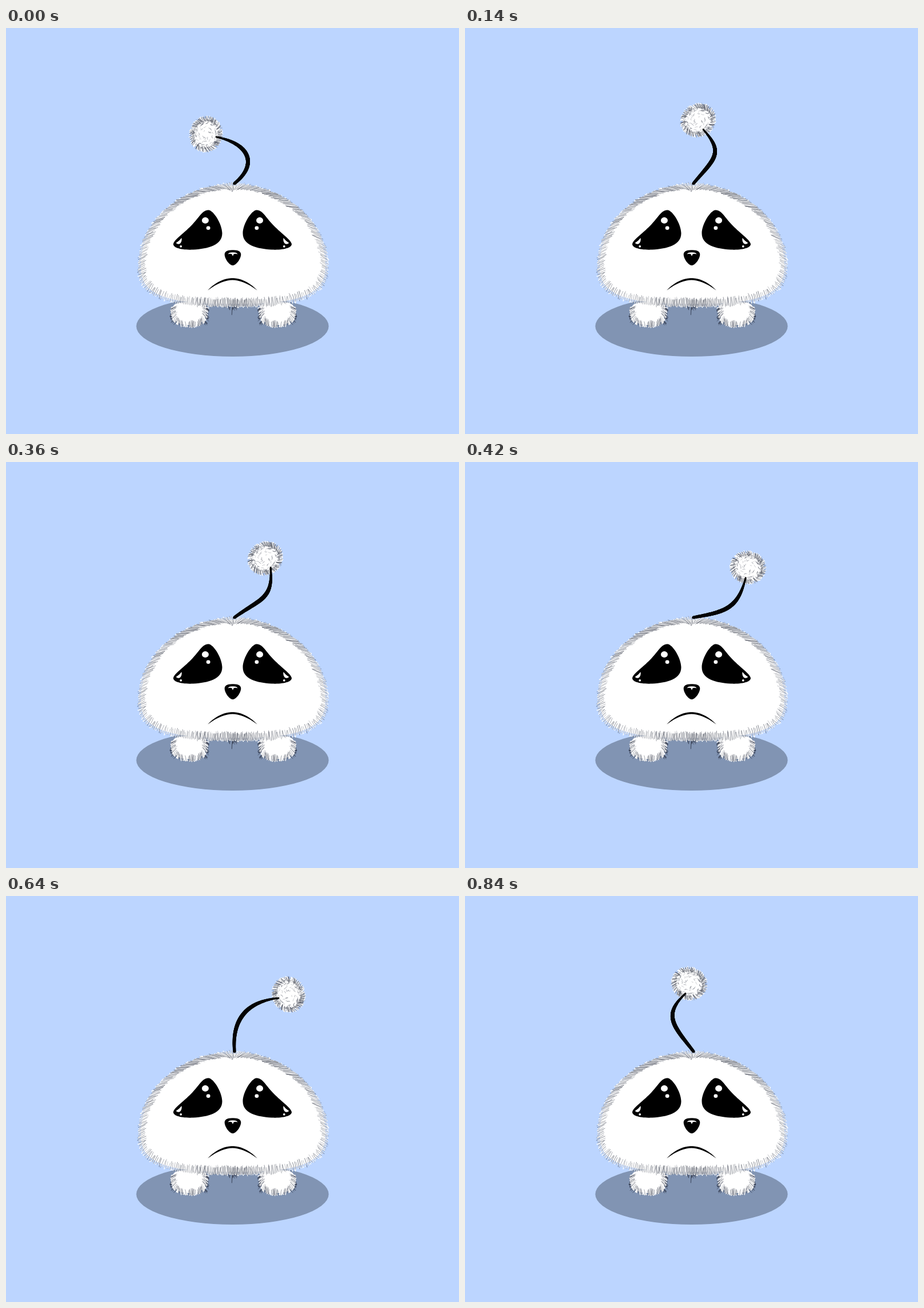
These frames come from a looping animation (791 by 708 pixels, 980 ms). An HTML page with a canvas:

```html
<!DOCTYPE html>
<html lang="en">
<head>
<meta charset="utf-8">
<title>Sad fluffy creature</title>
<style>
  html, body { margin: 0; width: 100%; height: 100%; overflow: hidden; background: #bcd5ff; }
  canvas { display: block; }
</style>
</head>
<body>
<canvas id="stage" width="791" height="708"></canvas>
<script>
const W = 791, H = 708, STEP = 140, TAU = Math.PI * 2;
const MID = 396.5, FACE = 395.5, ROOT = { x: 399, y: 271 };
const HANDLE = 56, PUFF_REACH = 18.5;
const ctx = document.getElementById('stage').getContext('2d');

// Tip x, tip y, then headings in degrees clockwise from up: at the root, at the tip, of the puff.
const poses = [
  [367, 190, 51, -79, -75],
  [416, 177, 40, -42, -29],
  [462, 184, 54, -5, -30],
  [490, 202, 80, 14, 12],
  [476, 178, -5, 84, 70],
  [438, 167, -35, 72, 49],
  [385, 170, -38, 47, 20]
];

const clamp = (v, lo, hi) => Math.max(lo, Math.min(hi, v));

function random(seed) {
  return () => {
    seed = (seed + 0x6d2b79f5) | 0;
    let t = Math.imul(seed ^ (seed >>> 15), 1 | seed);
    t = (t + Math.imul(t ^ (t >>> 7), 61 | t)) ^ t;
    return ((t ^ (t >>> 14)) >>> 0) / 4294967296;
  };
}

function ahead(p, degrees, dist) {
  const a = degrees * Math.PI / 180;
  return { x: p.x + Math.sin(a) * dist, y: p.y - Math.cos(a) * dist };
}

// Superellipse whose upper and lower halves differ in height and squareness.
// Runs from the top over the left side, so the outward normal is (-dy, dx).
function blob(cx, cy, rx, up, down = up, nUp = 2, nDown = nUp) {
  const count = 360;
  const at = i => {
    const a = i / count * TAU, s = Math.sin(a), c = Math.cos(a);
    const ry = c > 0 ? up : down, n = c > 0 ? nUp : nDown;
    const r = (Math.abs(s / rx) ** n + Math.abs(c / ry) ** n) ** (-1 / n);
    return { x: cx - r * s, y: cy - r * c };
  };
  return Array.from({ length: count }, (_, i) => {
    const p = at(i), q = at(i + 1), gap = Math.hypot(q.x - p.x, q.y - p.y);
    return { ...p, gap, dx: (q.x - p.x) / gap, dy: (q.y - p.y) / gap };
  });
}

function fillCurve(g, curve, color) {
  g.fillStyle = color;
  g.beginPath();
  curve.forEach(p => g.lineTo(p.x, p.y));
  g.fill();
}

function fillPath(g, d, color) {
  g.fillStyle = color;
  g.fill(new Path2D(d));
}

function ellipse(g, x, y, rx, ry, color) {
  g.fillStyle = color;
  g.beginPath();
  g.ellipse(x, y, rx, ry, 0, 0, TAU);
  g.fill();
}

function hair(g, x, y, ux, uy, len, bend, width, color) {
  g.strokeStyle = color;
  g.lineWidth = width;
  g.beginPath();
  g.moveTo(x, y);
  g.quadraticCurveTo(x + ux * len / 2 - uy * bend, y + uy * len / 2 + ux * bend, x + ux * len, y + uy * len);
  g.stroke();
}

const ink = alpha => `rgba(30,36,52,${alpha.toFixed(2)})`;

// A white ragged edge first, thin dark hairs over it.
function fur(g, curve, { seed, len, density, alpha, lean }) {
  const rnd = random(seed);
  for (const dark of [false, true]) {
    for (const p of curve) {
      if (rnd() > p.gap * density) continue;
      const k = lean(p), jitter = (rnd() - 0.5) * 0.4;
      let ux = -p.dy + p.dx * (k + jitter), uy = p.dx + p.dy * (k + jitter);
      const m = Math.hypot(ux, uy);
      ux /= m;
      uy /= m;
      const size = len * (0.7 + rnd() * 0.5) * Math.sqrt(m), back = size * (0.55 + rnd() * 0.2);
      const shade = dark ? ink(alpha * (0.4 + rnd() * 0.6)) : '#fff';
      hair(g, p.x - ux * back, p.y - uy * back, ux, uy, size, (rnd() - 0.5) * 3, dark ? 0.8 : 1.5, shade);
    }
  }
}

function mirrored(g, axis, draw) {
  draw(g);
  g.save();
  g.translate(2 * axis, 0);
  g.scale(-1, 1);
  draw(g);
  g.restore();
}

function drawFoot(g) {
  const foot = blob(320.5, 490, 29, 12, 28, 3, 2.7), rnd = random(11);
  for (let i = 0; i < 70; i++) {
    const side = i % 2 ? 1 : -1, y = 484 + rnd() * 29;
    const x = 320.5 + side * (29 - Math.max(0, y - 500) * 0.4);
    hair(g, x, y, side * 0.55, 0.83, 4 + rnd() * 6, side * 2, 0.9, ink(0.6));
  }
  fillCurve(g, foot, '#fff');
  fur(g, foot.filter(p => p.y > 486), {
    seed: 12, len: 10, density: 0.8, alpha: 0.55, lean: p => clamp((320.5 - p.x) / 30, -0.6, 0.6)
  });
}

function drawEye(g) {
  fillPath(g, `M353 317.5 C362 317 377.5 342 377.5 358 C377.5 379 353 385 327 386.5
    C306 387.5 290.5 383 292.3 376 C294 369 312 357 326 342 C338 329 343 318 353 317.5Z`, '#000');
  ellipse(g, 348, 335.5, 6, 5.4, '#fff');
  ellipse(g, 353.2, 348.8, 3.4, 3.2, '#fff');
  ellipse(g, 305.3, 380.8, 1.9, 1.9, '#fff');
  fillPath(g, 'M306.5 366 Q308 373 303 376.5 Q298 377.5 297 374.5 Q302 372 306.5 366Z', '#fff');
}

function drawNose(g) {
  fillPath(g, `M396 387.3 C406 387 410.3 390 410.3 395 C410.3 402 402 414 396 414
    C390 414 381.7 402 381.7 395 C381.7 390 386 387 396 387.3Z`, '#000');
  fillPath(g, `M387.5 394.5 Q389 390.8 396 391.2 Q403 390.8 404.5 394.5 Q400 393 397.5 394.5
    L396 398 L394.5 394.5 Q391 393 387.5 394.5Z`, '#fff');
}

function drawMouth(g) {
  fillPath(g, `M352.3 457.5 C368 441 384 436.3 395.5 436.3 C407 436.3 423 441 438.7 457.5
    C421 444.5 406 439.6 395.5 439.6 C385 439.6 370 444.5 352.3 457.5Z`, '#000');
}

function drawCreature(g) {
  g.lineCap = 'round';
  g.fillStyle = '#bcd5ff';
  g.fillRect(0, 0, W, H);
  ellipse(g, FACE, 520, 168, 53, '#8194b3');

  mirrored(g, 397, drawFoot);
  const rnd = random(5);
  for (let i = 0; i < 16; i++) {
    hair(g, 385 + rnd() * 20, 482, (rnd() - 0.5) * 0.4, 1, 5 + rnd() * 6, 1, 0.8, ink(0.55));
  }
  hair(g, 396, 484, -0.1, 1, 16, 1, 1.2, ink(0.6));

  const body = blob(MID, 412, 161, 137, 69, 1.95, 2.9);
  fillCurve(g, body, '#fff');
  fur(g, body, {
    seed: 71, len: 14, density: 0.85, alpha: 0.72,
    lean: p => clamp((MID - p.x) / 25, -1, 1) * clamp((460 - p.y) / 85, 0, 2)
  });

  mirrored(g, FACE, drawEye);
  drawNose(g);
  drawMouth(g);
}

function drawPuff(g) {
  const rnd = random(42), rx = 28, ry = 25, edge = blob(0, 0, rx, ry);
  g.lineCap = 'round';
  fillCurve(g, edge, '#fff');
  fur(g, edge, { seed: 43, len: 9, density: 0.85, alpha: 0.6, lean: () => 0.4 });
  for (let i = 0; i < 110; i++) {
    const a = rnd() * TAU, ring = Math.ceil(Math.sqrt(rnd()) * 4) * 0.22, turn = a + 1.1 + (rnd() - 0.5) * 1.2;
    hair(g, Math.cos(a) * rx * ring, Math.sin(a) * ry * ring, Math.cos(turn), Math.sin(turn),
      2.5 + rnd() * 2.5, 1, 0.65, ink(0.2 + rnd() * 0.4));
  }
}

function drawStalk(g, tip, rootTurn, tipTurn) {
  const c1 = ahead(ROOT, rootTurn, HANDLE), c2 = ahead(tip, tipTurn, -HANDLE), steps = 140;
  for (let i = 0; i <= steps; i++) {
    const t = i / steps, s = 1 - t;
    const mix = k => s ** 3 * ROOT[k] + 3 * s * s * t * c1[k] + 3 * s * t * t * c2[k] + t ** 3 * tip[k];
    const r = 2.6 + Math.sin(Math.PI * t) - 1.2 * t ** 4;
    ellipse(g, mix('x'), mix('y'), r, r, '#050505');
  }
}

const scene = document.createElement('canvas');
scene.width = W;
scene.height = H;
drawCreature(scene.getContext('2d'));

let shown = -1;
function render(time) {
  const index = Math.floor(time / STEP) % poses.length;
  if (index === shown) return;
  shown = index;
  const [x, y, rootTurn, tipTurn, lean] = poses[index];
  const tip = { x, y }, puff = ahead(tip, lean, PUFF_REACH);
  ctx.drawImage(scene, 0, 0);
  ctx.save();
  ctx.translate(puff.x, puff.y);
  ctx.rotate(lean * Math.PI / 180);
  drawPuff(ctx);
  ctx.restore();
  drawStalk(ctx, tip, rootTurn, tipTurn);
}

let start;
function tick(now) {
  start ??= now;
  render(Math.max(0, now - start));
  requestAnimationFrame(tick);
}
render(0);
requestAnimationFrame(tick);
</script>
</body>
</html>
```
